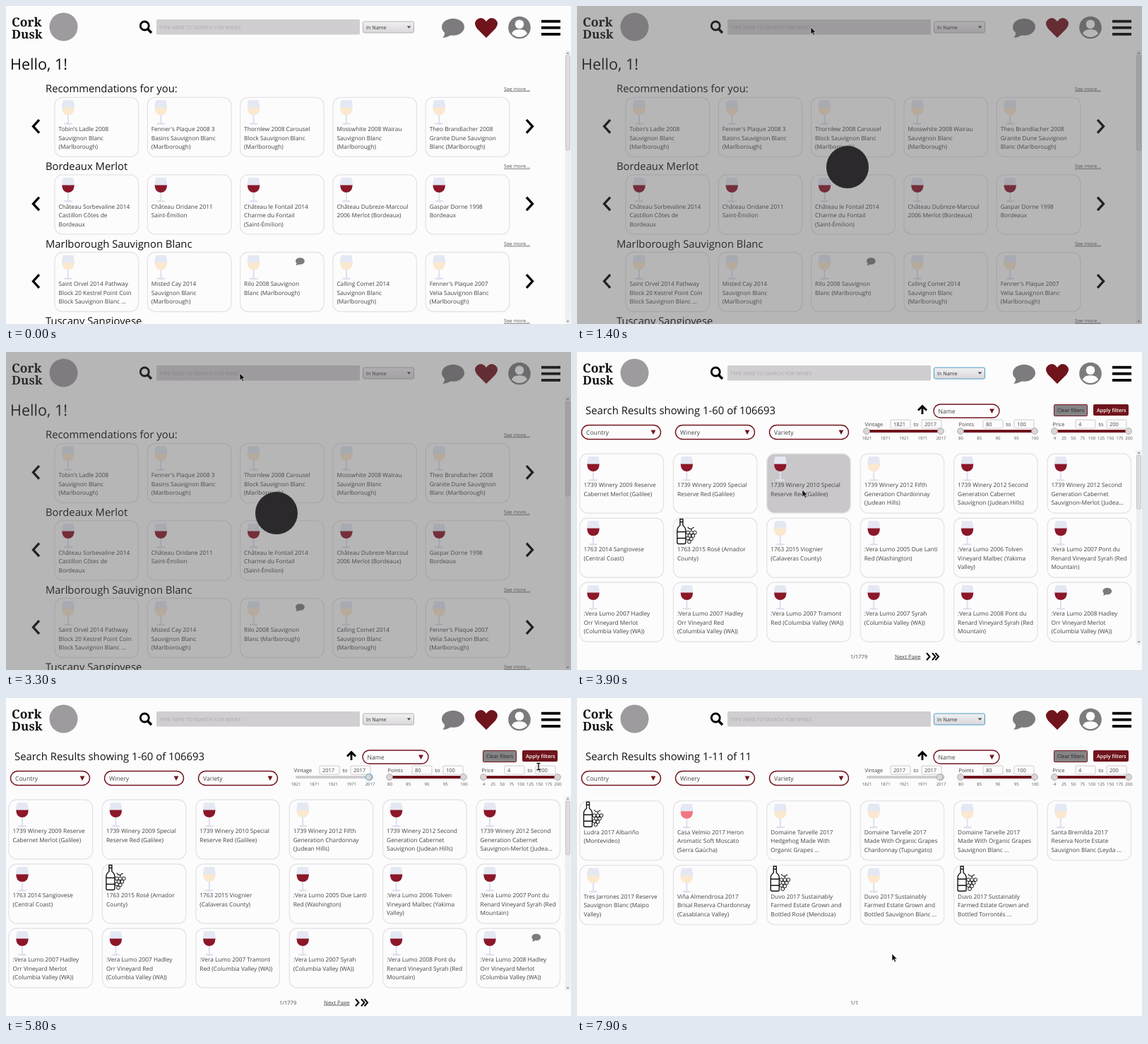
Animation of 800x450 px, one loop 8 s. Source, as an HTML page:

```html
<!DOCTYPE html>
<html lang="en">
<head>
<meta charset="utf-8">
<title>Wine browser</title>
<style>
  html, body { margin: 0; width: 100%; height: 100%; overflow: hidden; background: #fdfcfd; }
  svg { display: block; width: 800px; height: 450px; font-family: "Open Sans", "Noto Sans", sans-serif; text-rendering: geometricPrecision; }
  .card { fill: #fdfcfd; stroke: #e5e3e7; stroke-width: 1.3; }
  .link { text-decoration: underline; }
</style>
</head>
<body>
<svg id="stage" viewBox="0 0 800 450"></svg>
<script>
const LOOP = 8000;
const WINE = '#70141c', GREY = '#7d7b7e';
const CARD_W = 118.5, CARD_H = 84;

// Card text: first letter is the icon (r red, w white, p rosé, b bottle),
// upper case adds a comment bubble; "|" breaks the line.
const shelves = [
  ['Recommendations for you:', [
    "w Tobin's Ladle 2008|Sauvignon Blanc|(Marlborough)",
    "w Fenner's Plaque 2008 3|Basins Sauvignon Blanc|(Marlborough)",
    'w Thornlew 2008 Carousel|Block Sauvignon Blanc|(Marlborough)',
    'w Mosswhite 2008 Wairau|Sauvignon Blanc|(Marlborough)',
    'w Theo Brandlacher 2008|Granite Dune Sauvignon|Blanc (Marlborough)']],
  ['Bordeaux Merlot', [
    'r Château Sorbevaline 2014|Castillon Côtes de|Bordeaux',
    'r Château Oridane 2011|Saint-Émilion',
    'r Château le Fontail 2014|Charme du Fontail|(Saint-Émilion)',
    'r Château Dubreze-Marcoul|2006 Merlot  (Bordeaux)',
    'r Gaspar Dorne 1998|Bordeaux']],
  ['Marlborough Sauvignon Blanc', [
    'w Saint Orvel 2014 Pathway|Block 20 Kestrel Point Coin|Block Sauvignon Blanc ...',
    'w Misted Cay 2014|Sauvignon Blanc|(Marlborough)',
    'W Rilo 2008 Sauvignon|Blanc (Marlborough)',
    'w Calling Comet 2014|Sauvignon Blanc|(Marlborough)',
    "w Fenner's Plaque 2007|Velia Sauvignon Blanc|(Marlborough)"]],
  ['Tuscany Sangiovese', []]
];
const allWines = [
  'r 1739 Winery 2009 Reserve|Cabernet Merlot (Galilee)',
  'r 1739 Winery 2009 Special|Reserve Red (Galilee)',
  'r 1739 Winery 2010 Special|Reserve Red (Galilee)',
  'w 1739 Winery 2012 Fifth|Generation Chardonnay|(Judean Hills)',
  'r 1739 Winery 2012 Second|Generation Cabernet|Sauvignon (Judean Hills)',
  'r 1739 Winery 2012 Second|Generation Cabernet|Sauvignon-Merlot (Judea...',
  'r 1763 2014 Sangiovese|(Central Coast)',
  'b 1763 2015 Rosé (Amador|County)',
  'w 1763 2015 Viognier|(Calaveras County)',
  'r :Vera Lumo 2005 Due Lanti|Red (Washington)',
  'r :Vera Lumo 2006 Tolven|Vineyard Malbec (Yakima|Valley)',
  'r :Vera Lumo 2007 Pont du|Renard Vineyard Syrah (Red|Mountain)',
  'r :Vera Lumo 2007 Hadley|Orr Vineyard Merlot|(Columbia Valley (WA))',
  'r :Vera Lumo 2007 Hadley|Orr Vineyard Red|(Columbia Valley (WA))',
  'r :Vera Lumo 2007 Tramont|Red (Columbia Valley (WA))',
  'r :Vera Lumo 2007 Syrah|(Columbia Valley (WA))',
  'r :Vera Lumo 2008 Pont du|Renard Vineyard Syrah (Red|Mountain)',
  'R :Vera Lumo 2008 Hadley|Orr Vineyard Merlot|(Columbia Valley (WA))'
];
const filteredWines = [
  'b Ludra 2017 Albariño|(Montevideo)',
  'p Casa Velmio 2017 Heron|Aromatic Soft Moscato|(Serra Gaúcha)',
  'w Domaine Tarvelle 2017|Hedgehog Made With|Organic Grapes ...',
  'w Domaine Tarvelle 2017|Made With Organic Grapes|Chardonnay (Tupungato)',
  'w Domaine Tarvelle 2017|Made With Organic Grapes|Sauvignon Blanc ...',
  'w Santa Bremilda 2017|Reserva Norte Estate|Sauvignon Blanc (Leyda ...',
  'w Tres Jarrones 2017 Reserve|Sauvignon Blanc (Maipo|Valley)',
  'w Viña Almendrosa 2017|Brisal Reserva Chardonnay|(Casablanca Valley)',
  'b Duvo 2017 Sustainably|Farmed Estate Grown and|Bottled Rosé (Mendoza)',
  'w Duvo 2017 Sustainably|Farmed Estate Grown and|Bottled Sauvignon Blanc ...',
  'b Duvo 2017 Sustainably|Farmed Estate Grown and|Bottled Torrontés ...'
];

const text = (x, y, size, str, fill = '#444', attrs = '') =>
  `<text x="${x}" y="${y}" font-size="${size}" fill="${fill}" ${attrs}>${str}</text>`;
const rect = (x, y, w, h, fill, attrs = '') =>
  `<rect x="${x}" y="${y}" width="${w}" height="${h}" fill="${fill}" ${attrs}/>`;
const circle = (x, y, r, fill, attrs = '') =>
  `<circle cx="${x}" cy="${y}" r="${r}" fill="${fill}" ${attrs}/>`;
const path = (d, fill, attrs = '') => `<path d="${d}" fill="${fill}" ${attrs}/>`;
const line = (d, width, color = '#000') => path(d, 'none', `stroke="${color}" stroke-width="${width}"`);
const at = (x, y, body, scale = 1) => `<g transform="translate(${x} ${y}) scale(${scale})">${body}</g>`;
const group = (id, body) => `<g id="${id}">${body}</g>`;
const arrowDown = (x, y, w, h, fill) => path(`M${x - w} ${y}h${2 * w}l${-w} ${h}z`, fill);

const bubble = (x, y, scale) => at(x, y,
  `<ellipse rx="16" ry="12" fill="${GREY}"/>` + path('M-12 5Q-11 12-15 15Q-7 15-2 10z', GREY), scale);

const glass = wine =>
  rect(-1, 20, 2, 13, '#dde1ef') + '<ellipse cy="33.3" rx="6.5" ry="1.4" fill="#dde1ef"/>' +
  path('M-7 0Q-9.6 8-8.7 12Q-7 21 0 21Q7 21 8.7 12Q9.6 8 7 0z', '#e4e8f3') +
  path('M-8.7 10.5H8.7Q8.5 21 0 21Q-8.5 21-8.7 10.5z', wine);

const bottle = () => at(-3.5, -1.5,
  path('M-6-1h4v9q4 3 4 7v17q0 2-2 2h-8q-2 0-2-2v-17q0-4 4-7zM-10 17h12M-10 26h12M-6 3h4', '#fdfcfd',
    'stroke="#111" stroke-width="1.4"') +
  [[5, 18], [10, 18], [15, 18], [7.5, 22.5], [12.5, 22.5], [5, 26], [10, 27], [7, 31]]
    .map(([x, y]) => circle(x, y, 2.4, '#fdfcfd', 'stroke="#111"')).join('') +
  line('M10 15q0-4 4-4M10 13q-4 0-5-3', 1.1, '#111'));

const wineColors = { r: '#8b1729', w: '#fae8cf', p: '#f17580' };

function card(x, y, entry, baseline) {
  const kind = entry[0].toLowerCase();
  const icon = kind === 'b' ? bottle() : glass(wineColors[kind]);
  const lines = entry.slice(2).split('|')
    .map((s, i) => text(x + 5.5, y + baseline + i * 12.6, 8.3, s)).join('');
  const comment = entry[0] !== kind ? bubble(x + 84.8, y + 12.5, 0.4) : '';
  return rect(x, y, CARD_W, CARD_H, '#fdfcfd', 'rx="11" class="card"') +
    at(x + 19, y + 4, icon) + comment + lines;
}

const chevron = (x, y, dx, dy, w) => line(`M${x} ${y - dy}l${dx} ${dy}l${-dx} ${dy}`, w);

function scrollbar(top, bottom, thumbEnd) {
  return rect(791.5, top, 8, bottom - top, '#f0eff0') +
    rect(792.5, top + 7, 6, thumbEnd - top - 7, '#dddbdd', 'rx="1.5" stroke="#c2c0c2" stroke-width=".8"') +
    path(`M793.5 ${top + 4.5}l2-2 2 2zM793.5 ${bottom - 4.5}l2 2 2-2z`, '#777');
}

function header() {
  const logo = 'font-weight="900" font-family="\'Noto Serif\', serif"';
  return text(8, 29, 17.5, 'Cork', '#111', logo) + text(8, 46, 17, 'Dusk', '#111', logo) +
    circle(81.5, 29.5, 20, '#9d9b9d') +
    circle(196.3, 28, 6, 'none', 'stroke="#000" stroke-width="2.8"') + line('M200.5 32.5l5.5 5.5', 3.6) +
    rect(213, 19, 288, 21.5, '#d0ced0', 'rx="1.5"') +
    text(217, 32.5, 7.2, 'TYPE HERE TO SEARCH FOR WINES', '#aba9ab') +
    rect(505.5, 22, 72, 16, 'url(#button)', 'id="combo" rx="2" stroke="#b4b2b4"') +
    text(510, 32.8, 7.2, 'In Name', '#333') + arrowDown(570.5, 28.5, 2.8, 3, '#444') +
    bubble(633, 29.8, 1) +
    path('M680 45L667 32Q661 24 667 19Q674 14 680 22Q686 14 693 19Q699 24 693 32z', WINE) +
    circle(727, 30.5, 15.8, GREY) + circle(727, 25.8, 6.3, '#fdfcfd') +
    path('M716 39Q718 33 727 33Q736 33 738 39Q733 44 727 44Q721 44 716 39z', '#fdfcfd') +
    [19.8, 28.8, 38].map(y => rect(758, y, 27, 3.8, '#000')).join('');
}

function home() {
  const rows = shelves.map(([title, wines], row) => {
    const y = 129.3 + row * 109.6;
    const cards = wines.map((wine, i) => card(69 + i * 131.3, y, wine, 47.7)).join('');
    return text(56, y - 7, 14.8, title, '#111') +
      text(705, y - 9.8, 7.1, 'See more...', '#555', 'class="link"') + cards +
      chevron(47, y + 41, -8.5, 9.3, 3.3) + chevron(737, y + 41, 8.5, 9.3, 3.3);
  }).join('');
  return text(6, 90, 21.6, 'Hello, 1!', '#111') + rows + scrollbar(63, 450, 204);
}

const pill = (x, y, w, h, label) =>
  rect(x, y, w, h, '#fdfcfd', `rx="${h / 2}" stroke="${WINE}" stroke-width="1.4"`) +
  text(x + 6.5, y + h / 2 + 3.3, 8.6, label) + arrowDown(x + w - 10.5, y + h / 2 - 3, 3.4, 6.5, WINE);

const field = (x, value, id = '') =>
  rect(x, 96, 28, 12, '#fdfcfd', 'rx="1.5" stroke="#c6c4c6" stroke-width=".9"') +
  text(x + 4, 104.8, 7.5, value, '#444', id);

const thumb = (x, id = '') => circle(x, 112, 4.4, '#d9d7d9', `stroke="#a6a4a6" stroke-width=".9" ${id}`);

function slider(x, label, fields, low, high, ticks, name) {
  const tickStep = 105 / (ticks.length - 1);
  const id = part => `id="${name}-${part}"`;
  return text(x - 2.5, 104.8, 7.4, label) + field(fields[0], low, id('value')) +
    text(fields[0] + 32.5, 104.8, 7.4, 'to') + field(fields[1], high) +
    rect(x, 110, 105, 4, '#cfcdcf', 'rx="2"') + rect(x, 110, 105, 4, WINE, id('fill')) +
    thumb(x + 105) + thumb(x, id('thumb')) +
    ticks.map((t, i) => text(x + 0.5 + i * tickStep, 123.5, 6, t, '#555', 'text-anchor="middle"')).join('');
}

function filters() {
  return path('M489 74.5l7 7-2 2-3.6-3.6V88h-2.8v-8.1l-3.6 3.6-2-2z', '#000') +
    pill(505, 74, 93, 19, 'Name') + pill(6.5, 103.5, 112, 20, 'Country') +
    pill(139.5, 103.5, 112, 20, 'Winery') + pill(272.5, 103.5, 112, 20, 'Variety') +
    rect(675.5, 74.5, 47, 16, '#858385', `stroke="${WINE}" rx="1"`) + text(680, 85.3, 7.2, 'Clear filters', '#222') +
    rect(731, 74, 50, 16, WINE, 'rx="2"') + text(736, 84.8, 7.2, 'Apply filters', '#fff', 'font-weight="600"') +
    slider(410, 'Vintage', [444, 488], 1821, 2017, [1821, 1871, 1921, 1971, 2017], 'vintage') +
    slider(543, 'Points', [575, 619], 80, 100, [80, 85, 90, 95, 100], 'points') +
    slider(676, 'Price', [706, 750], 4, 200, [4, 25, 50, 75, 100, 125, 150, 175, 200], 'price');
}

const cell = (i, top) => ({ x: 4 + (i % 6) * 132.4, y: top + Math.floor(i / 6) * 91 });

function results(wines, top, title, page) {
  return text(12, 87.5, 14.9, title, '#111') + text(387, 434, 7.5, page) +
    wines.map((wine, i) => { const p = cell(i, top); return card(p.x, p.y, wine, 47); }).join('');
}

const pager = text(450, 433.5, 7.8, 'Next Page', '#444', 'class="link"') +
  chevron(495, 431, 4.5, 5, 2) + chevron(503, 431, 4.5, 5, 2) + chevron(507.5, 431, 4.5, 5, 2);

document.getElementById('stage').innerHTML = `
  <defs><linearGradient id="button" x2="0" y2="1">
    <stop stop-color="#f1f0f1"/><stop offset="1" stop-color="#d9d7d9"/>
  </linearGradient></defs>` +
  rect(0, 0, 800, 450, '#fdfcfd') + header() +
  group('home', home()) +
  group('filters', filters()) +
  group('all', results(allWines, 144, 'Search Results showing 1-60 of 106693', '1/1779') + pager + scrollbar(139, 414, 222)) +
  group('filtered', results(filteredWines, 145.7, 'Search Results showing 1-11 of 11', '1/1')) +
  group('loading', rect(0, 0, 800, 450, '#545154', 'opacity=".41"') + circle(383, 228, 30, '#2b292b')) +
  group('pointer', path('M0 0v10l2.3-2.1 1.6 3.6 1.8-.8-1.6-3.5h3.2z', '#111', 'stroke="#eee" stroke-width=".6"')) +
  group('beam', line('M-2.5-4.5h5M0-4.5v9M-2.5 4.5h5', 1.3, '#111'));

const $ = id => document.getElementById(id);
const show = (id, on) => $(id).setAttribute('display', on ? 'inline' : 'none');
const clamp01 = v => Math.min(1, Math.max(0, v));
const ease = v => v * v * (3 - 2 * v);

const LOAD_ALL = 1100, SHOW_ALL = 3500, DRAG = 4650, DRAG_END = 5350, LOAD_FILTERED = 6450, SHOW_FILTERED = 7200;

const track = [
  [LOAD_ALL, 331, 30], [SHOW_ALL, 331, 30], [3850, 319, 195], [4100, 319, 195], [4550, 410, 110],
  [DRAG, 410, 110], [DRAG_END, 513, 110], [5780, 754, 97], [5900, 754, 97], [6150, 757, 82],
  [LOAD_FILTERED, 757, 82], [6680, 602, 154], [6900, 602, 154], [7700, 446, 362], [LOOP, 446, 362]
];

function cursorAt(t) {
  const i = Math.max(1, track.findIndex(k => k[0] >= t));
  const [t0, x0, y0] = track[i - 1], [t1, x1, y1] = track[i];
  const p = ease(clamp01((t - t0) / (t1 - t0)));
  return [x0 + (x1 - x0) * p, y0 + (y1 - y0) * p];
}

function hover(id, top, x, y, active) {
  $(id).querySelectorAll('.card').forEach((el, i) => {
    const p = cell(i, top);
    const inside = active && x > p.x && x < p.x + CARD_W && y > p.y && y < p.y + CARD_H;
    el.style.fill = inside ? '#c9c7c9' : '';
  });
}

function render(t) {
  const loading = (t >= LOAD_ALL && t < SHOW_ALL) || (t >= LOAD_FILTERED && t < SHOW_FILTERED);
  const onAll = t >= SHOW_ALL && t < SHOW_FILTERED;
  show('home', t < SHOW_ALL);
  show('filters', t >= SHOW_ALL);
  show('all', onAll);
  show('filtered', t >= SHOW_FILTERED);
  show('loading', loading);

  const comboFocus = (t >= SHOW_ALL && t < DRAG) || t >= SHOW_FILTERED;
  $('combo').setAttribute('stroke', comboFocus ? '#4a9fc9' : '#b4b2b4');

  const drag = ease(clamp01((t - DRAG) / (DRAG_END - DRAG)));
  const low = 410 + drag * 103.5;
  $('vintage-value').textContent = Math.round(1821 + drag * 196);
  $('vintage-fill').setAttribute('x', low);
  $('vintage-fill').setAttribute('width', drag < 1 ? 515 - low : 0);
  $('vintage-thumb').setAttribute('cx', low);
  $('vintage-thumb').setAttribute('stroke', t >= DRAG && t < LOAD_FILTERED ? '#4a9fc9' : '#a6a4a6');

  const [x, y] = cursorAt(t);
  const overField = !loading && t > 5700 && y > 95 && y < 109 && x > 749 && x < 779;
  show('pointer', t >= LOAD_ALL && !overField);
  show('beam', overField);
  for (const id of ['pointer', 'beam']) $(id).setAttribute('transform', `translate(${x} ${y})`);
  hover('all', 144, x, y, onAll && !loading);
  hover('filtered', 145.7, x, y, t >= SHOW_FILTERED);
}

const start = performance.now();
function tick() {
  render((performance.now() - start) % LOOP);
  requestAnimationFrame(tick);
}
tick();
</script>
</body>
</html>
```
